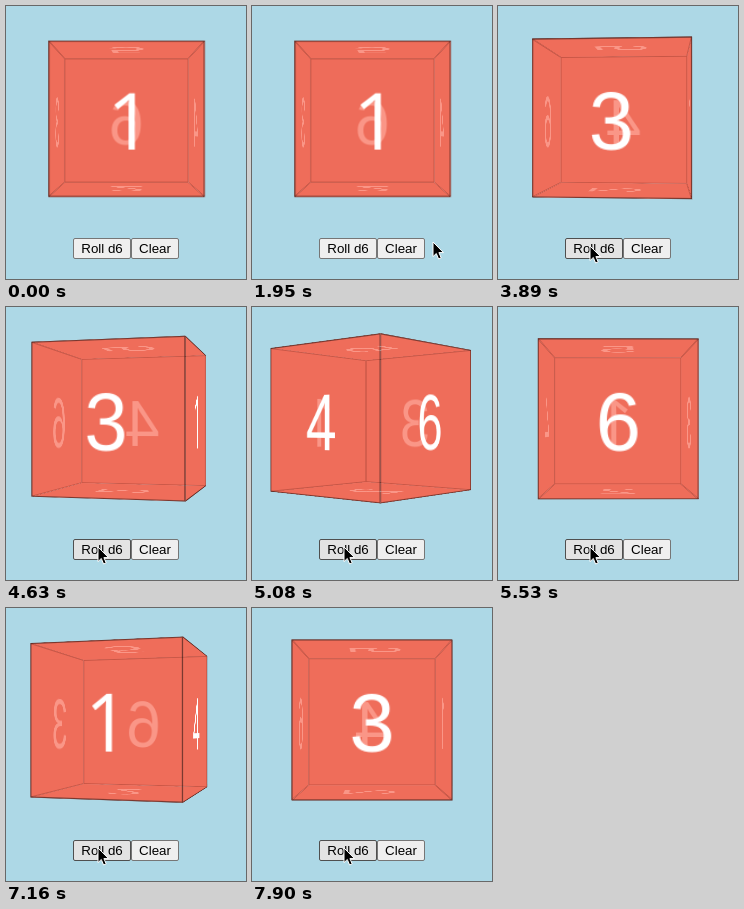
These frames come from a looping animation (240x273 px, 8000 ms). An HTML page:

```html
<!DOCTYPE html>
<html lang="en">
<head>
<meta charset="utf-8">
<title>Dice</title>
<style>
html, body { margin: 0; width: 100%; height: 100%; overflow: hidden; background: lightblue; }
body { position: relative; font-family: "Liberation Sans", Arial, sans-serif; }
#view {
  position: absolute; left: 0; top: 0; width: 240px; height: 273px;
  perspective: 600px; perspective-origin: 120px 121px;
}
#cube {
  position: absolute; left: 49.4px; top: 42.4px; width: 142px; height: 142px;
  transform-style: preserve-3d;
}
.face {
  position: absolute; box-sizing: border-box; width: 142px; height: 142px;
  border: 1px solid rgba(0, 0, 0, .5); background: rgba(248, 95, 72, .65);
  color: #fff; font-size: 72px; line-height: 146px; text-align: center;
}
/* a digit one without a foot */
.one { position: relative; left: 2.5px; line-height: 0; font-family: "Open Sans", sans-serif; }
.btn {
  position: absolute; top: 232px; height: 21px; box-sizing: border-box;
  border: 1px solid #767676; border-radius: 2px; background: #efefef;
  color: #000; font-size: 13.333px; line-height: 19px; text-align: center; white-space: nowrap;
}
.btn.hover { background: #e3e3e3; border-color: #4f4f4f; }
#roll { left: 67px; width: 58px; }
#clear { left: 125px; width: 48px; }
#arrow { position: absolute; left: 0; top: 0; width: 14px; height: 20px; }
</style>
</head>
<body>
<div id="view"><div id="cube"></div></div>
<div id="roll" class="btn">Roll d6</div>
<div id="clear" class="btn">Clear</div>
<svg id="arrow" viewBox="-1 -1 14 20">
  <path d="M0 0V14.6L3.3 11.5L5.6 17L8.2 15.9L5.9 10.6H10.5Z" fill="#000" stroke="#fff" stroke-width="1"/>
</svg>
<script>
const LOOP = 8000, FIRST = 1496, STEP = 148.9, ROLL = 1000, HALF = 71;
const byId = id => document.getElementById(id);
const cube = byId('cube'), roll = byId('roll'), arrow = byId('arrow');

const faces = {
  1: 'rotateY(0deg)', 6: 'rotateY(180deg)', 4: 'rotateY(90deg)',
  3: 'rotateY(-90deg)', 5: 'rotateX(90deg)', 2: 'rotateX(-90deg)'
};
for (const n in faces) {
  const el = document.createElement('div');
  const digit = document.createElement('span');
  el.className = 'face';
  digit.textContent = n;
  digit.classList.toggle('one', n === '1');
  el.style.transform = `${faces[n]} translateZ(${HALF}px)`;
  el.append(digit);
  cube.append(el);
}

// start time, yaw before, yaw after
const rolls = [
  [3170, 0, 90],
  [4557, 90, -180],
  [6002, -180, -90],
  [6907, -90, 90]
];

const path = [
  [227, 258], [197, 245], [197, 245], [181, 236], [152, 228],
  [122, 228], [102, 234], [94, 239], [92, 240]
];

const bez = (u, a, b) => 3 * u * (1 - u) * (1 - u) * a + 3 * u * u * (1 - u) * b + u * u * u;

// cubic-bezier(.25, .1, .25, 1)
function ease(x) {
  if (x <= 0) return 0;
  if (x >= 1) return 1;
  let lo = 0, hi = 1;
  for (let i = 0; i < 24; i++) {
    const mid = (lo + hi) / 2;
    if (bez(mid, .25, .25) < x) lo = mid; else hi = mid;
  }
  return bez(lo, .1, 1);
}

function poseCube(t) {
  let yaw = 0;
  for (const [start, from, to] of rolls)
    if (t >= start) yaw = from + (to - from) * ease((t - start) / ROLL);
  const rest = 1 - ease((t - rolls[0][0]) / ROLL);
  cube.style.transform =
    `translate3d(${.5 * rest}px, ${.5 * rest}px, ${-16 * rest}px) rotateY(${yaw}deg)`;
}

function posePointer(k) {
  arrow.style.display = k < 0 ? 'none' : 'block';
  const [x, y] = path[Math.min(Math.max(k, 0), path.length - 1)];
  arrow.style.transform = `translate(${x - 1}px, ${y - 1}px)`;
  roll.classList.toggle('hover', k >= 0 && x >= 67 && x < 125 && y >= 232 && y < 253);
}

function draw(now) {
  const t = now % LOOP;
  const k = Math.floor((t - FIRST) / STEP);
  poseCube(FIRST + 4 + k * STEP);
  posePointer(k);
}

function tick() {
  draw(performance.now());
  requestAnimationFrame(tick);
}
tick();
</script>
</body>
</html>
```
